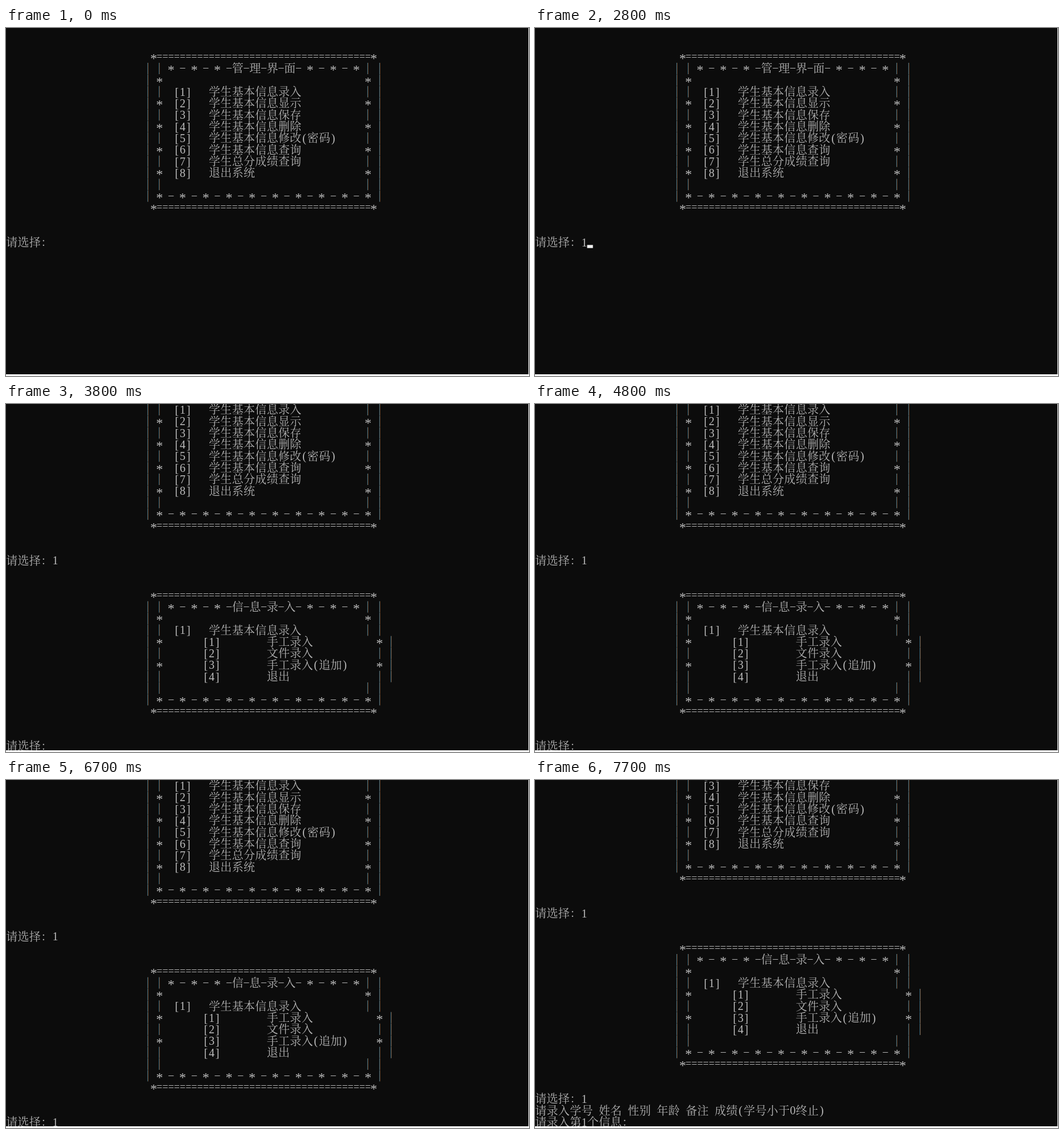
An HTML page that plays this animation: 918x610 px, repeating every 8000 ms.

```html
<!DOCTYPE html>
<html lang="zh-CN">
<head>
<meta charset="utf-8">
<title>管理界面</title>
<style>
  html, body { margin: 0; width: 100%; height: 100%; overflow: hidden; background: #fff; }
  svg { display: block; width: 918px; height: 610px; overflow: hidden; }
  text { fill: #bcbcbc; font: 20px "Liberation Serif", serif; text-anchor: middle; }
  text.wide { fill: #b4b4b4; font: 300 20px "Noto Serif CJK SC", "Noto Sans CJK SC", "Noto Sans CJK", serif; }
  text.star { font-size: 24px; }
  text.line { font-size: 18px; }
</style>
</head>
<body>
<svg id="stage" viewBox="0 0 918 610">
  <rect width="917" height="607" fill="#0c0c0c"/>
  <g id="page"></g>
  <rect y="607" width="918" height="3" fill="#fff"/>
  <rect x="917" width="1" height="610" fill="#fff"/>
</svg>
<script>
const NS = "http://www.w3.org/2000/svg";
const CW = 10.166, RH = 20.333, LOOP = 8000;
const page = document.getElementById("page");

// glyph: [text, baseline in the row, class]
const glyphs = {
  "*": ["*", 20.3, "star"],
  "-": ["–", 14.4, "line"],
  "=": ["=", 15.2, "line"]
};

function add(parent, tag, attrs, text) {
  const el = document.createElementNS(NS, tag);
  for (const k in attrs) el.setAttribute(k, attrs[k]);
  if (text) el.textContent = text;
  return parent.appendChild(el);
}

// a bar has a blue and an orange fringe, as subpixel text does
function bar(layer, mid, y) {
  const x = Math.round(mid) - 1;
  add(layer, "rect", { x, y, width: 1, height: 20, fill: "#275a70" });
  add(layer, "rect", { x: x + 1, y, width: 1, height: 20, fill: "#70482c" });
}

function put(layer, row, col, str) {
  const y = row * RH;
  for (const ch of str) {
    const wide = ch.charCodeAt(0) > 0x2e80;
    const span = wide ? 2 : 1;
    const x = (col + span / 2) * CW;
    if (ch === "|") {
      bar(layer, x, y);
    } else if (ch !== " ") {
      const [t, dy, cls] = wide ? [ch, 17.2, "wide"] : glyphs[ch] || [ch, 16.9, ""];
      add(layer, "text", { x, y: y + dy, class: cls }, t);
    }
    col += span;
  }
}

function frame(layer, top, bottom, title) {
  const rule = "*" + "=".repeat(37) + "*";
  put(layer, top, 25, rule);
  put(layer, top + 1, 24, `| | * - * - * -${[...title].join("-")}- * - * - * | |`);
  edges(layer, top + 2, "*");
  edges(layer, bottom - 2, "|");
  put(layer, bottom - 1, 24, "| " + "* - ".repeat(9) + "* |");
  put(layer, bottom, 25, rule);
  put(layer, bottom + 3, 0, "请选择：");
}

function edges(layer, row, mark, right = 62) {
  put(layer, row, 24, "| " + mark);
  put(layer, row, right, mark + " |");
}

const layer = () => add(page, "g", {});
const menu = layer(), pick1 = layer(), sub = layer(), pick2 = layer(), form = layer();

frame(menu, 2, 15, "管理界面");
["学生基本信息录入", "学生基本信息显示", "学生基本信息保存", "学生基本信息删除",
 "学生基本信息修改(密码)", "学生基本信息查询", "学生总分成绩查询", "退出系统"].forEach((s, i) => {
  edges(menu, 5 + i, i % 2 ? "*" : "|");
  put(menu, 5 + i, 29, `[${i + 1}]   ${s}`);
});
put(pick1, 18, 8, "1");

frame(sub, 21, 31, "信息录入");
edges(sub, 24, "|");
put(sub, 24, 29, "[1]   学生基本信息录入");
["手工录入", "文件录入", "手工录入(追加)", "退出"].forEach((s, i) => {
  edges(sub, 25 + i, i % 2 ? "|" : "*", 64);
  put(sub, 25 + i, 34, `[${i + 1}]        ${s}`);
});
put(pick2, 34, 8, "1");

put(form, 35, 0, "请录入学号 姓名 性别 年龄 备注 成绩(学号小于0终止)");
put(form, 36, 0, "请录入第1个信息：");

const cursor = add(page, "rect", { width: CW, height: 5.4, fill: "#f2f2f2" });

// visible spans of the cursor: [from, to, row, column]
const blinks = [
  [900, 1400, 18, 8], [1900, 2200, 18, 8], [2200, 2400, 18, 9], [2800, 3000, 18, 9],
  [3000, 3800, 34, 8], [4300, 4800, 34, 8], [5300, 5600, 34, 8], [5600, 5700, 34, 9],
  [6200, 6700, 34, 9], [6800, 7700, 36, 17]
];
const show = (el, on) => el.setAttribute("visibility", on ? "visible" : "hidden");

function draw(t) {
  show(pick1, t >= 2200);
  show(sub, t >= 3000);
  show(pick2, t >= 5600);
  show(form, t >= 6800);
  const scroll = t >= 6800 ? 7 : t >= 3000 ? 5 : 0;
  page.setAttribute("transform", `translate(0 ${-scroll * RH})`);
  const b = blinks.find(([from, to]) => t >= from && t < to);
  show(cursor, b);
  if (b) {
    cursor.setAttribute("x", b[3] * CW);
    cursor.setAttribute("y", b[2] * RH + 14.3);
  }
}

const start = performance.now();
function tick() {
  draw((performance.now() - start) % LOOP);
  requestAnimationFrame(tick);
}
tick();
</script>
</body>
</html>
```
